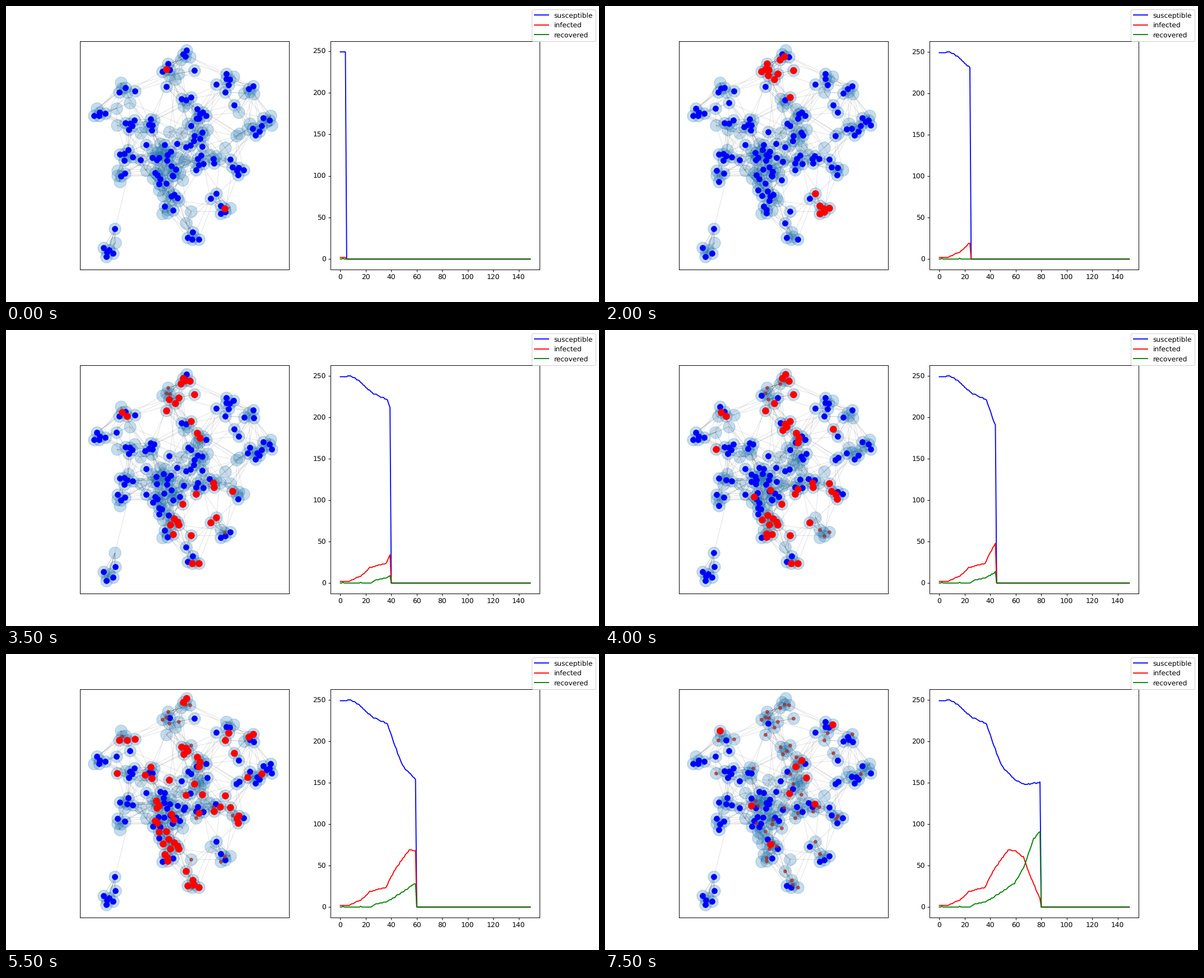
A matplotlib script for the animation above (8 s loop, 1058 px wide and 529 px high).

```python
import numpy as np
import matplotlib.pyplot as plt
from matplotlib.animation import FuncAnimation
from matplotlib.collections import LineCollection

W, H = 1058, 529
STEPS, FRAMES, PER_FRAME = 150, 16, 5
CENTER = np.array([315, 240])
SOURCES = [(286, 113), (390, 362)]

# Centres of the crowded spots, in stage pixels
HUBS = SOURCES + [
    (320, 90), (207, 147), (399, 131), (435, 153), (167, 190), (321, 168),
    (346, 193), (221, 210), (255, 212), (350, 226), (448, 220), (470, 204),
    (211, 264), (205, 304), (268, 262), (288, 266), (344, 284), (370, 273),
    (412, 294), (270, 302), (299, 296), (278, 320), (295, 340), (288, 364),
    (335, 412), (180, 440),
]

plt.rcParams["text.hinting"] = "none"
rng = np.random.default_rng(7)


def curve(t, v):
    """Whole-number counts along a few key points, slightly uneven."""
    y = np.interp(np.arange(FRAMES * PER_FRAME), t, v)
    return np.maximum(0, np.rint(y + rng.normal(0, 0.4, y.size)))


def around(hub, radius, angle):
    return hub + np.column_stack([radius * np.cos(angle),
                                  radius * np.sin(angle)])


def make_places(tight=5, loose=2):
    """A tight spiral on each hub, and a few places towards the centre."""
    pts = []
    for hub in np.array(HUBS, float):
        i = np.arange(tight)
        pts.append(around(hub, 13 * np.sqrt(i / tight),
                          2.4 * i + rng.uniform(0, 2 * np.pi)))
        dx, dy = CENTER - hub
        pts.append(around(hub, rng.uniform(22, 46, loose),
                          np.arctan2(dy, dx) + rng.uniform(-0.7, 0.7, loose)))
    return np.vstack(pts)


def make_links(pts, each=5):
    """Mostly short links, with a rare long one."""
    links = []
    for i, p in enumerate(pts):
        d = np.hypot(*(pts - p).T)
        w = np.exp(-d / 18) + 1e-3 * (d < 150)
        w[i] = 0
        for j in rng.choice(len(pts), each, replace=False, p=w / w.sum()):
            links.append((p, pts[j]))
    return links


def infection_order(pts):
    """Rank of each place as the disease spreads out from the sources."""
    d = np.min([np.hypot(*(pts - s).T) for s in SOURCES], axis=0)
    return np.argsort(np.argsort(d * rng.uniform(0.5, 1.6, len(pts))))


susceptible = curve([0, 8, 15, 24, 37, 43, 49, 59, 67, 79],
                    [249, 250, 244, 231, 221, 194, 170, 154, 148, 150])
infected = curve([0, 7, 16, 24, 36, 43, 54, 60, 66, 70, 79],
                 [2, 2, 9, 19, 24, 46, 69, 68, 60, 43, 10])
recovered = curve([0, 24, 28, 36, 44, 59, 66, 74, 79],
                  [0, 0, 4, 6, 13, 29, 47, 82, 92])
series = [susceptible, infected, recovered]

places = make_places()
rank = infection_order(places)
bias = rng.random(len(places))


def place_states(k):
    """0 empty, 1 susceptible, 2 infected, 3 recovered."""
    now = PER_FRAME * (k + 1) - 1
    over = rank < recovered[now]
    hot = ~over & (rank < recovered[now] + np.ceil(0.85 * infected[now]))
    chance, seen = np.random.default_rng(100 + k).random((2, len(places)))
    blue = chance < np.where(over, 0.4 * bias, 0.35 + 0.6 * bias)
    state = np.where(blue, 1, np.where(over & (seen < 0.7), 3, 0))
    state[hot] = 2
    return state


fig, (net, plot) = plt.subplots(1, 2, figsize=(12, 6), dpi=W / 12)

# The left panel works in stage pixels
box = net.get_position()
net.set(xlim=(box.x0 * W, box.x1 * W), xticks=[], yticks=[],
        ylim=((1 - box.y0) * H, (1 - box.y1) * H))
net.add_collection(LineCollection(make_links(places), colors="black",
                                  linewidths=0.8, alpha=0.12, zorder=1),
                   autolim=False)
net.scatter(*places.T, s=300, c="#1f77b4", alpha=0.25, linewidths=1, zorder=2)


def dots(size, color, z, alpha=1):
    return net.scatter([], [], s=size, c=color, alpha=alpha,
                       linewidths=1, zorder=z)


layers = {1: dots(60, "blue", 3), 2: dots(85, "red", 5),
          3: dots(20, "brown", 4, 0.7)}

lines = [plot.plot(np.zeros(STEPS), color=c, label=name)[0]
         for c, name in (("blue", "susceptible"), ("red", "infected"),
                         ("green", "recovered"))]
fig.legend(loc="upper right")


def update(k):
    state = place_states(k)
    for s, layer in layers.items():
        layer.set_offsets(places[state == s])
    n = PER_FRAME * (k + 1)
    for line, values in zip(lines, series):
        y = np.zeros(STEPS)
        y[:n] = values[:n]
        line.set_ydata(y)
    plot.relim()
    plot.autoscale_view()
    return [*layers.values(), *lines]


anim = FuncAnimation(fig, update, frames=FRAMES, interval=500,
                     init_func=lambda: update(0), repeat=True, repeat_delay=0)
plt.show()
```
